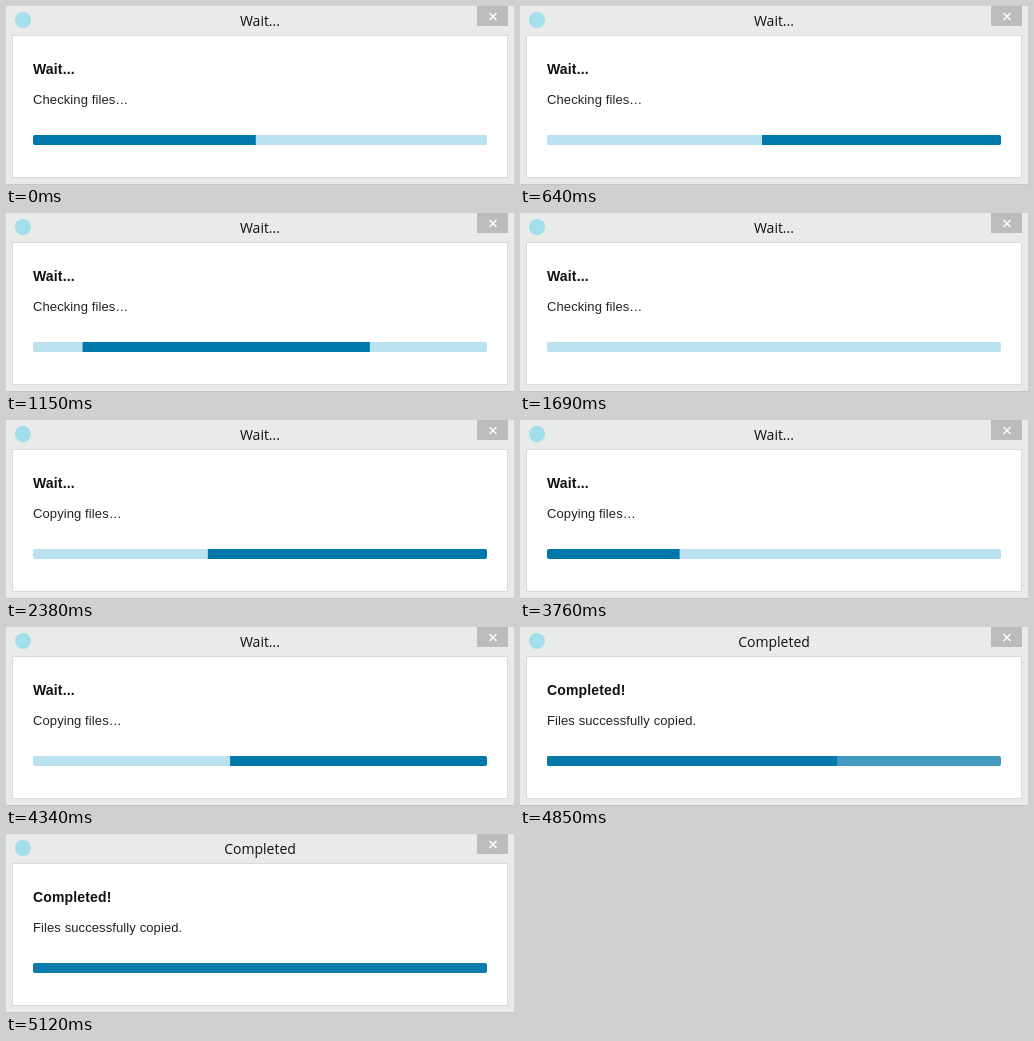
An HTML page for the animation above (5930 ms loop, 508 by 179 pixels).

```html
<!DOCTYPE html>
<html lang="en">
<head>
<meta charset="utf-8">
<style>
  html, body { margin: 0; width: 100%; height: 100%; overflow: hidden; background: #e9eaea; }
  svg { display: block; width: 508px; height: 179px; }
  text { white-space: pre; }
  .title { font: 14px "Open Sans", "Noto Sans", sans-serif; text-anchor: middle; fill: #111; }
  .head { font: bold 14px "Liberation Sans", Arial, sans-serif; letter-spacing: .15px; fill: #111; }
  .info { font: 13px "Liberation Sans", Arial, sans-serif; letter-spacing: .1px; fill: #222; }
</style>
</head>
<body>
<svg viewBox="0 0 508 179">
  <defs>
    <clipPath id="track"><rect x="27" y="129" width="454" height="10" rx="2"/></clipPath>
  </defs>
  <rect width="508" height="179" fill="#e9eaea"/>
  <rect y="178" width="508" height="1" fill="#c4c5c5"/>
  <circle cx="17" cy="14" r="8" fill="#a2dfeb"/>
  <rect x="471" width="31" height="20" fill="#bcbcbc"/>
  <path d="M483.5 7 l7 7 m0 -7 l-7 7" stroke="#fff" stroke-width="1.4" fill="none"/>
  <rect x="6.5" y="29.5" width="495" height="142" fill="#fff" stroke="#d9dada"/>
  <text id="title" class="title" x="254" y="20"></text>
  <text id="head" class="head" x="27" y="68"></text>
  <text id="info" class="info" x="27" y="98"></text>
  <g clip-path="url(#track)">
    <rect x="27" y="129" width="454" height="10" fill="#bae1f0"/>
    <g fill="#0077a9">
      <rect id="long" y="129" height="10"/>
      <rect id="short" y="129" height="10"/>
    </g>
    <rect id="done" x="27" y="129" width="454" height="10" fill="#0c7cac"/>
  </g>
</svg>
<script>
const LOOP = 5930, COPY = 2020, DONE = 4670, LAST = 5120;
const CYCLE = 2100, SWEEP = 1260, DELAY = 1150, FADE = 450;
const X = 27, W = 454;
const $ = id => document.getElementById(id);

function bezier(x1, y1, x2, y2) {
  const at = (u, a, b) => 3 * u * (1 - u) ** 2 * a + 3 * u * u * (1 - u) * b + u ** 3;
  return x => {
    if (x <= 0) return 0;
    if (x >= 1) return 1;
    let lo = 0, hi = 1;
    for (let i = 0; i < 30; i++) {
      const mid = (lo + hi) / 2;
      if (at(mid, x1, x2) < x) lo = mid; else hi = mid;
    }
    return at(lo, y1, y2);
  };
}
const longEase = bezier(.65, .815, .735, .395);
const shortEase = bezier(.165, .84, .44, 1);
const ease = bezier(.25, .1, .25, 1);

// Stage time to bar clock, both in ms
const CLOCK = [[0, 283], [100, 305], [640, 884], [2380, 2833], [3160, 3684], [4340, 5017], [5120, 5884]];
function barClock(t) {
  let i = 1;
  while (i < CLOCK.length - 1 && t > CLOCK[i][0]) i++;
  const [t0, p0] = CLOCK[i - 1], [t1, p1] = CLOCK[i];
  return p0 + (p1 - p0) * (t - t0) / (t1 - t0);
}

// The picture advances in 30 ms ticks
function tick(t) {
  if (t < 100) return 0;
  const start = t < 4280 ? 100 : 4280;
  return Math.min(LAST, start + 30 * Math.floor((t - start) / 30));
}

function span(id, left, right) {
  const a = Math.max(0, Math.min(1, left)), b = Math.max(a, Math.min(1, right));
  $(id).setAttribute("x", X + W * a);
  $(id).setAttribute("width", W * (b - a));
}

function label(id, text) {
  if ($(id).textContent !== text) $(id).textContent = text;
}

function draw(time) {
  const t = tick(time), done = t >= DONE, clock = barClock(t);
  const p = longEase(clock % CYCLE / SWEEP);
  const q = shortEase((clock - DELAY + CYCLE) % CYCLE / SWEEP);
  span("long", -.35 + 1.35 * p, 1.9 * p);
  span("short", -2 + 3.07 * q, 1.08 * q);
  $("done").setAttribute("opacity", t >= LAST ? 1 : ease((t - DONE) / FADE));
  label("title", done ? "Completed" : "Wait...");
  label("head", done ? "Completed!" : "Wait...");
  label("info", done ? "Files successfully copied." : t >= COPY ? "Copying files…" : "Checking files…");
}

const begin = performance.now();
function frame() {
  draw((performance.now() - begin) % LOOP);
  requestAnimationFrame(frame);
}
frame();
</script>
</body>
</html>
```
